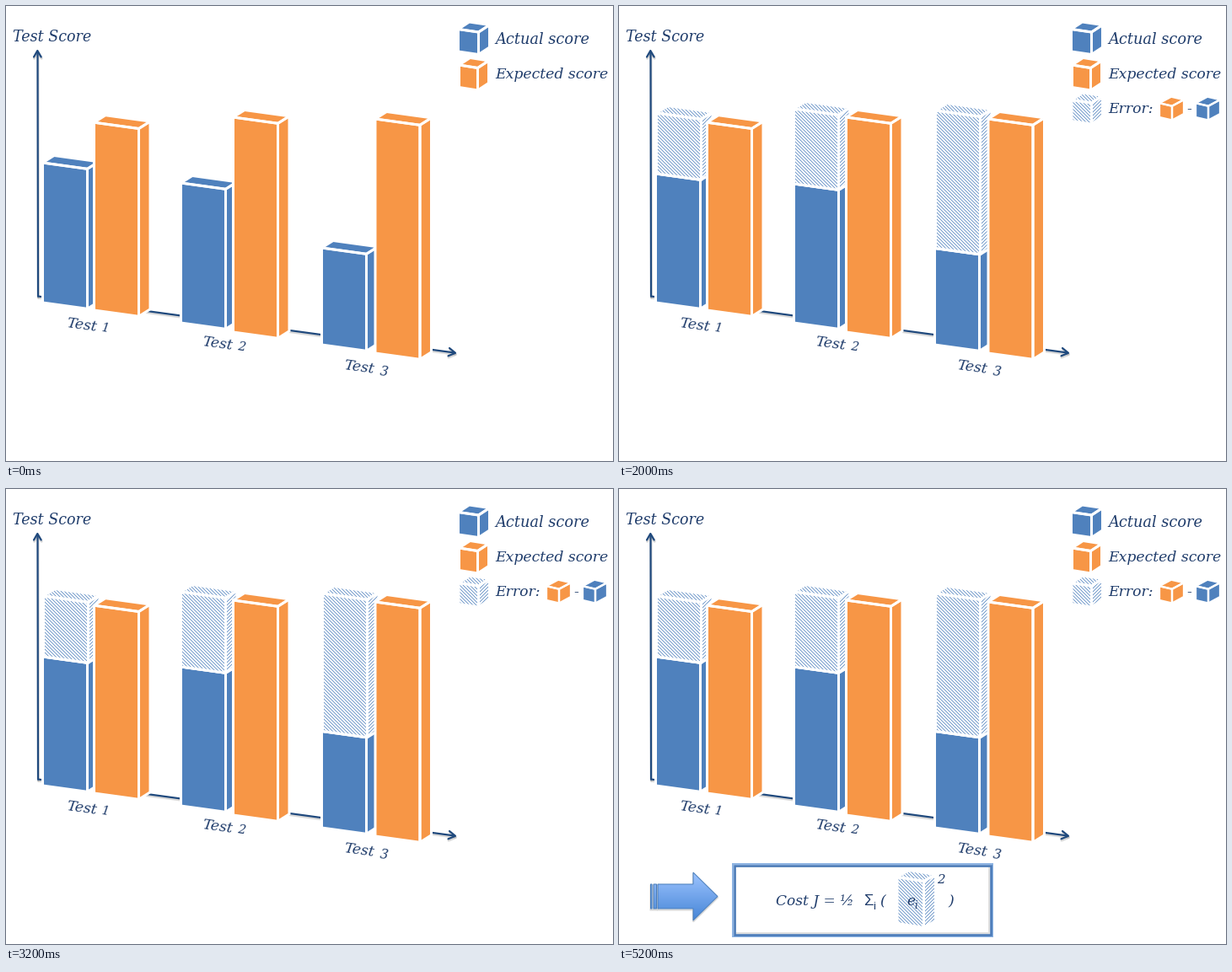
Animation of 720 by 540 pixels, one loop 6000 ms. Source, as a matplotlib script:

```python
import itertools

import matplotlib.pyplot as plt
import numpy as np
from matplotlib.animation import FuncAnimation
from matplotlib.collections import LineCollection
from matplotlib.patches import PathPatch, Polygon, Rectangle
from matplotlib.path import Path

W, H = 720, 540
BLUE, ORANGE = "#4f81bd", "#f79646"
NAVY, AXIS = "#1f3c6b", "#1f497d"
HATCH_STEP = 4

# name, blue x, blue top before / after, blue bottom, error x, error top,
# orange x, orange top, orange bottom
TESTS = [
    ("1", 43.5, 186, 199, 352, 44.5, 127, 104.5, 138.2, 361),
    ("2", 207.5, 210, 211, 376, 207.5, 122, 269.5, 132, 387),
    ("3", 374.5, 287, 287.5, 402, 375.5, 124, 438, 134, 412),
]
# label start, digit size, digit drop
LABELS = [((71, 381), 14.5, 0), ((232, 403), 14.5, 0), ((400.5, 431), 15.5, 3)]

fig = plt.figure(figsize=(W / 72, H / 72), dpi=72, facecolor="white")
ax = fig.add_axes([0, 0, 1, 1])
layer = itertools.count()


def text(x, y, s, size=17.3, family="DejaVu Serif", style="italic", angle=0):
    ax.text(x, y, s, size=size, family=family, style=style, color=NAVY,
            rotation=angle, rotation_mode="anchor", va="baseline",
            zorder=next(layer))


def line(points, color, width, alpha=1):
    xs, ys = zip(*points)
    ax.plot(xs, ys, color=color, lw=width, alpha=alpha, zorder=next(layer),
            solid_capstyle="round", solid_joinstyle="round")


def hatch(face, points, rising):
    """Fill a face with thin diagonal lines on a shared pixel grid."""
    (x0, y0), (x1, y1) = np.min(points, 0), np.max(points, 0)
    slope = -1 if rising else 1
    low, high = sorted((slope * x0, slope * x1))
    first = np.floor((y0 - high) / HATCH_STEP) * HATCH_STEP
    shifts = np.arange(first, y1 - low + HATCH_STEP, HATCH_STEP)
    strokes = [[(x, slope * x + c) for x in (x0, x1)] for c in shifts]
    lines = LineCollection(strokes, colors=BLUE, linewidths=0.75,
                           zorder=next(layer))
    ax.add_collection(lines, autolim=False)
    lines.set_clip_path(face)


def box(x, top, bottom, color, w=53, skew=7.3, depth=(13.5, -8.5), edge=3):
    """Slanted 3D box; without a colour it is hatched."""
    dx, dy = depth
    r = x + w
    front = [(x, top), (r, top + skew), (r, bottom + skew), (x, bottom)]
    side = [(r, top + skew), (r + dx, top + skew + dy),
            (r + dx, bottom + skew + dy), (r, bottom + skew)]
    lid = [(x, top), (x + dx, top + dy), (r + dx, top + skew + dy),
           (r, top + skew)]
    for points in (side, lid, front):
        face = Polygon(points, fc=color or "white", ec="none",
                       zorder=next(layer))
        ax.add_patch(face)
        if color is None:
            hatch(face, points, rising=points is side)
    for points in (side, lid, front):
        ax.add_patch(Polygon(points, fc="none", ec="white", lw=edge,
                             joinstyle="round", zorder=next(layer)))


def cube(x, top, bottom, w, color):
    box(x, top, bottom, color, w, 3.5, (13, -8.5))


def small_cube(x, color):
    box(x, 115.2, 132, color, 15, 3.5, (14, -7.5), 2.3)


def axes_lines():
    strokes = [[(37.5, 55), (38, 344.5)], [(38, 344.5), (532, 411.5)],
               [(33, 60.5), (37.3, 53), (41.7, 60.5)],
               [(526, 406), (533, 411.8), (524.5, 415.3)]]
    for points in strokes:
        line([(x + 0.5, y + 1.7) for x, y in points], "#808080", 3, 0.3)
    for points in strokes:
        line(points, AXIS, 2.2)


def chart(with_error):
    axes_lines()
    for test, (at, size, fall) in zip(TESTS, LABELS):
        name, bx, before, after, bottom, ex, etop, ox, otop, obottom = test
        top = after if with_error else before
        box(bx, top, bottom, BLUE)
        if with_error:
            box(ex, etop, top, None)
        box(ox, otop, obottom, ORANGE)
        text(*at, "Test", angle=-8)
        text(at[0] + 42, at[1] + 4.5 + fall, name, size, angle=-8)
    text(7.5, 42, "Test Score", 17.5)


def legend(with_error):
    cube(536.5, 27.5, 54, 24, BLUE)
    text(580, 45, "Actual score", 17.8)
    cube(537.5, 70, 96.5, 22, ORANGE)
    text(580, 86, "Expected score", 17.2)
    if with_error:
        cube(537, 111.5, 136.5, 23.5, None)
        text(580, 127, "Error:")
        small_cube(641, ORANGE)
        text(673.5, 127, "-")
        small_cube(684, BLUE)


def arrow():
    def strip(x0, x1):
        return [(x0, 469), (x1, 469), (x1, 498), (x0, 498)]

    head = [(46, 469), (88, 469), (88, 455), (117, 483.5), (88, 512),
            (88, 498), (46, 498)]
    parts = [strip(37.5, 39), strip(41, 44.5), head]
    path = Path.make_compound_path(
        *(Path(p + p[:1], closed=True) for p in parts))
    shadow = Path(path.vertices + (0, 1.5), path.codes)
    ax.add_patch(PathPatch(shadow, fc="none", ec="#808080", lw=2, alpha=0.3,
                           zorder=next(layer)))
    low, high = np.array([0.27, 0.52, 0.84]), np.array([0.62, 0.77, 1.0])
    mix = np.linspace(0, 1, 60)[:, None, None]
    image = ax.imshow(high + (low - high) * mix, extent=(36, 118, 513, 454),
                      aspect="auto", zorder=next(layer))
    outline = PathPatch(path, fc="none", ec="#4a7ebb", lw=1,
                        zorder=next(layer))
    ax.add_patch(outline)
    image.set_clip_path(outline)


def frame_rect(inset, color, width, alpha=1):
    ax.add_patch(Rectangle((133.5 + inset, 443.5 + inset),
                           310 - 2 * inset, 88 - 2 * inset, fc="none",
                           ec=color, lw=width, alpha=alpha,
                           zorder=next(layer)))


def formula():
    arrow()
    frame_rect(4.5, "#808080", 2, 0.25)
    frame_rect(1, "#8db3e2", 2)
    frame_rect(3, "#4a7ab8", 2.6)
    text(186, 494, "Cost J = ½", 17)
    text(290.5, 494, "Σ", 18.5, "Liberation Sans", "normal")
    text(301.5, 499, "i", 13, "Liberation Sans", "normal")
    text(309.5, 494, "(")
    box(330, 460.5, 515.5, None, 31.5, 5, (14, -8))
    text(341, 494, "e", 17)
    text(350.5, 498, "i", 11.5)
    text(377, 468, "2", 15)
    text(390, 494, ")")


def draw(i):
    global layer
    layer = itertools.count(1)
    ax.cla()
    ax.set_xlim(0, W)
    ax.set_ylim(H, 0)
    ax.axis("off")
    chart(i > 0)
    legend(i > 0)
    if i == 2:
        formula()
    return []


anim = FuncAnimation(fig, draw, frames=3, interval=2000, repeat=True,
                     repeat_delay=0)
plt.show()
```
